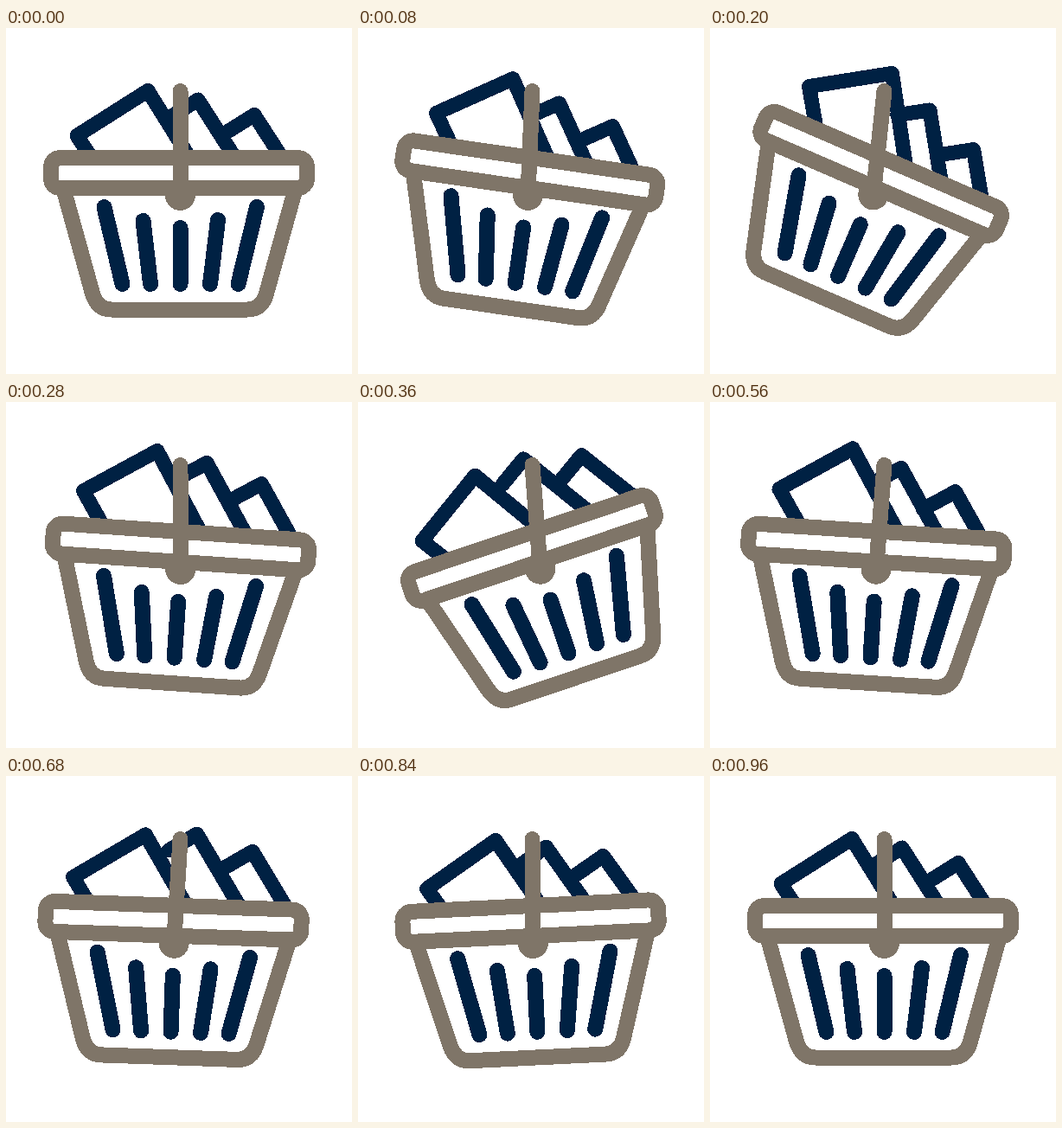
An HTML page that plays this animation: 400x400 px, repeating every 1.04 s.

```html
<!DOCTYPE html>
<html lang="en">
<head>
<meta charset="utf-8">
<title>Swinging basket</title>
<style>
  html, body { margin: 0; width: 100%; height: 100%; overflow: hidden; background: #fff; }
  svg { display: block; width: 100%; height: 100%; shape-rendering: crispEdges; }
  .navy, .taupe { fill: #fff; stroke-width: 18; stroke-linecap: round; stroke-linejoin: round; }
  .navy { stroke: #002143; }
  .taupe { stroke: #7f7568; }
  .box { fill: none; stroke-width: 17; }
</style>
</head>
<body>
<svg viewBox="0 0 400 400">
  <g id="swing">
    <g id="basket">
      <path class="navy box" id="box3" d="M251 123 L287 100.500 L330 167"/>
      <path class="navy box" id="box2" d="M190 103 L222 83 L273 163"/>
      <path class="navy box" id="box1" d="M115 175 L82 124.500 L164 72.500 L221 164"/>
      <path class="taupe" d="M67 188 L100 307 Q105.500 325.500 122 325.500 H279 Q296 325.500 301 307 L334 188"/>
      <rect class="taupe" x="52" y="150" width="296" height="35" rx="11"/>
      <path class="navy" d="M113.500 207 L134.500 296 M158.500 223 L167 296 M201.500 231 V296 M245 222 L236 296 M290 207 L268.500 296"/>
    </g>
    <path class="taupe" d="M201.500 73 V193"/>
    <circle cx="201.500" cy="193.500" r="17.500" fill="#7f7568"/>
  </g>
</svg>
<script>
  const LOOP = 1040, STEP = 40, HOP = 16.5;
  const get = id => document.getElementById(id);

  // [time in ms, angle in degrees]
  const handleKeys = [[0, 0], [190, 6.2], [320, -3], [365, -4.4], [480, -0.7],
    [600, 5.8], [680, 3.5], [800, -0.8], [840, -0.4], [960, 0]];
  const basketKeys = [[0, 0], [200, 23.4], [320, -9], [360, -18.6], [390, -20.5], [480, -12.7],
    [600, 8], [680, 2], [790, -3.6], [840, -2.8], [960, 0]];

  // take-off, bounce and landing times
  const hops = { box1: [10, 395, 695], box2: [170, 515, 835], box3: [195, 550, 860] };

  // Smooth curve through the keys that never overshoots them
  function curve(keys) {
    const slope = i => (keys[i + 1][1] - keys[i][1]) / (keys[i + 1][0] - keys[i][0]);
    const tangents = keys.map((k, i) => {
      if (i === 0 || i === keys.length - 1) return 0;
      const a = slope(i - 1), b = slope(i);
      return a * b <= 0 ? 0 : 2 * a * b / (a + b);
    });
    return t => {
      const last = keys.length - 1;
      if (t >= keys[last][0]) return keys[last][1];
      const i = keys.findIndex(k => k[0] > t) - 1;
      const [t0, v0] = keys[i], [t1, v1] = keys[i + 1];
      const d = t1 - t0, u = (t - t0) / d, w = 1 - u;
      return v0 * (1 + 2 * u) * w * w + v1 * u * u * (3 - 2 * u)
        + d * u * w * (tangents[i] * w - tangents[i + 1] * u);
    };
  }

  function hopHeight([start, mid, end], t) {
    if (t <= start || t >= end) return 0;
    const [a, b] = t < mid ? [start, mid] : [mid, end];
    const u = (t - a) / (b - a);
    return HOP * 4 * u * (1 - u);
  }

  const handleAngle = curve(handleKeys), basketAngle = curve(basketKeys);
  const swing = get('swing'), basket = get('basket');
  const boxes = Object.entries(hops).map(([id, times]) => [get(id), times]);

  function draw(now) {
    const t = Math.floor(now % LOOP / STEP) * STEP;
    const tilt = handleAngle(t);
    swing.setAttribute('transform', `rotate(${tilt} 201.5 73)`);
    basket.setAttribute('transform', `rotate(${basketAngle(t) - tilt} 201.5 193.5)`);
    for (const [box, times] of boxes) {
      const h = hopHeight(times, t);
      box.setAttribute('transform', `translate(${0.1 * h} ${-h})`);
    }
  }

  let begin;
  function tick(now) {
    begin ??= now;
    draw(now - begin);
    requestAnimationFrame(tick);
  }
  draw(0);
  requestAnimationFrame(tick);
</script>
</body>
</html>
```
